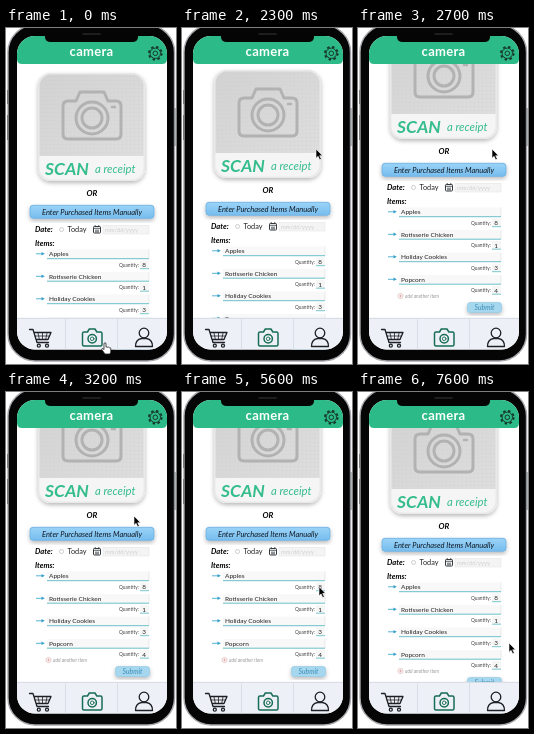
These frames come from a looping animation (170 px wide and 336 px high, 7.7 s). An HTML page:

```html
<!DOCTYPE html>
<html lang="en">
<head>
<meta charset="utf-8">
<title>Receipt app</title>
<style>
  html, body { margin: 0; width: 100%; height: 100%; overflow: hidden; background: #fff; }
  svg { display: block; width: 170px; height: 336px; font-family: Lato, "Open Sans", sans-serif; }
  .i { font-style: italic; }
  .b { font-weight: 700; }
  .line { fill: none; stroke-linecap: round; stroke-linejoin: round; }
</style>
</head>
<body>
<svg viewBox="0 0 170 336">
  <defs>
    <clipPath id="screen"><rect x="11" y="8" width="150" height="313.5" rx="18"/></clipPath>
    <clipPath id="cardClip"><rect x="32" y="45" width="107" height="108" rx="13"/></clipPath>
    <linearGradient id="photo" x1="0" y1="0" x2="1" y2="1">
      <stop offset="0" stop-color="#d2d2d2"/><stop offset="1" stop-color="#dedede"/>
    </linearGradient>
    <linearGradient id="blue" x1="0" y1="0" x2="0" y2="1">
      <stop offset="0" stop-color="#9bd3f8"/><stop offset="1" stop-color="#76bdee"/>
    </linearGradient>
    <pattern id="mesh" width="4" height="4" patternUnits="userSpaceOnUse">
      <path d="M0 0H4M0 0V4" stroke="#c8c8c8" stroke-width=".5"/>
    </pattern>
    <filter id="soft" x="-20%" y="-20%" width="140%" height="150%">
      <feDropShadow dx="0" dy="2" stdDeviation="2" flood-color="#000" flood-opacity=".28"/>
    </filter>
  </defs>

  <!-- phone body -->
  <rect x="2" y="-3" width="166.5" height="336" rx="27" fill="#050506" stroke="#a4a6aa" stroke-width="1.4"/>
  <path d="M1.5 62V76M1.5 87V112M169 80V118" stroke="#77797d"/>

  <g clip-path="url(#screen)">
    <rect x="11" y="8" width="150" height="314" fill="#fff"/>

    <g id="page">
      <rect x="32" y="45" width="107" height="108" rx="13" fill="#f4f4f4" filter="url(#soft)"/>
      <g clip-path="url(#cardClip)">
        <rect x="32" y="45" width="107" height="83" fill="url(#photo)"/>
        <rect x="32" y="45" width="107" height="83" fill="url(#mesh)" opacity=".5"/>
        <rect x="32" y="128" width="107" height="25" fill="#f5f5f5"/>
      </g>
      <rect x="32.7" y="45.7" width="105.6" height="106.6" rx="12.5" fill="none" stroke="#e9e9e9" stroke-width="1.6"/>
      <g class="line" stroke="#b2b2b2" stroke-width="3">
        <path d="M62 73H70L74 64H98L102 73H110Q115 73 115 78V106Q115 111 110 111H62Q57 111 57 106V78Q57 73 62 73Z"/>
        <circle cx="86" cy="90" r="16"/>
        <circle cx="86" cy="90" r="10"/>
        <path d="M106 79H109" stroke-width="2.4"/>
      </g>
      <text class="i b" x="39" y="146.5" font-size="17.5" fill="#35bd8d">SCAN</text>
      <text class="i" x="89" y="145" font-size="11.3" fill="#35bd8d">a receipt</text>

      <text class="i b" x="86" y="168" font-size="8" text-anchor="middle">OR</text>

      <rect x="24" y="177.3" width="124" height="13" rx="3" fill="url(#blue)" stroke="#68aee0" stroke-width=".8" filter="url(#soft)"/>
      <text class="i" x="86" y="186.7" font-size="7.5" text-anchor="middle" fill="#101820">Enter Purchased Items Manually</text>

      <text class="i b" x="29" y="204" font-size="7.6">Date:</text>
      <circle cx="55.5" cy="201.5" r="2" fill="#fff" stroke="#bbb" stroke-width=".7"/>
      <text x="61.5" y="204" font-size="7.3" fill="#222">Today</text>
      <rect x="87.5" y="198.5" width="7" height="6.5" rx=".8" fill="#fff" stroke="#34393e" stroke-width="1"/>
      <path d="M87.5 200.3H94.5M89.2 197V199M92.8 197V199M89 202.2H93M89 203.8H93" stroke="#34393e" stroke-width=".8"/>
      <rect x="97" y="197.5" width="46" height="8.5" fill="#f4f4f4" stroke="#e2e2e2" stroke-width=".5"/>
      <text x="99" y="203.7" font-size="5.8" fill="#cfcfcf">mm/dd/yyyy</text>

      <text class="i b" x="29" y="218" font-size="7.6">Items:</text>
      <g id="items"></g>

      <circle cx="42.5" cy="310" r="2.6" fill="none" stroke="#dba9a9" stroke-width=".6"/>
      <path d="M41 310H44M42.5 308.5V311.5" stroke="#d08f8f" stroke-width=".6"/>
      <text class="i" x="47" y="312" font-size="4.8" fill="#999">add another item</text>
      <rect x="109.5" y="316.5" width="34" height="10" rx="2.5" fill="#a5d7ef" stroke="#8fc8e5" stroke-width=".6" filter="url(#soft)"/>
      <text class="i" x="126.5" y="324" font-size="6.8" text-anchor="middle" fill="#3f8db5">Submit</text>
    </g>

    <!-- header -->
    <path d="M11 0H161V31Q161 36 156 36H16Q11 36 11 31Z" fill="#2cbb88"/>
    <text class="b" x="85.5" y="27.8" font-size="13" letter-spacing=".3" text-anchor="middle" fill="#fff">camera</text>
    <g fill="none" stroke="#17352c">
      <circle cx="149.3" cy="25.3" r="6.4" stroke-width="1.8" stroke-dasharray="2.51 2.51"/>
      <circle cx="149.3" cy="25.3" r="5.2" stroke-width="1"/>
      <circle cx="149.3" cy="25.3" r="2.3" stroke-width="1"/>
    </g>

    <!-- tab bar -->
    <rect x="11" y="290" width="150" height="32" fill="#edf0f6"/>
    <path d="M11 290.3H161" stroke="#c9ced8" stroke-width=".7"/>
    <path d="M59.5 291V322M111.5 291V322" stroke="#d4d8e1" stroke-width=".8"/>
    <g class="line" stroke="#1d2024" stroke-width="1.3">
      <path d="M23.5 301.5H27L31 314.5H42.5M28 304.5H45L42 311.5H30"/>
      <path d="M32 305L33.3 311M36.5 305V311M41 305L39.8 311M29 308H43" stroke-width=".8"/>
      <circle cx="32.8" cy="317.7" r="1.5"/><circle cx="41" cy="317.7" r="1.5"/>
      <circle cx="138" cy="305" r="4.8"/>
      <path d="M129.5 318.5Q129.5 311.5 135.5 310.5H140.5Q146.5 311.5 146.5 318.5Z"/>
    </g>
    <g class="line" stroke="#176d55" stroke-width="1.5">
      <path d="M78 304H81.5L83.3 301H89L90.8 304H94.5Q96 304 96 305.5V316.5Q96 318 94.5 318H78Q76.5 318 76.5 316.5V305.5Q76.5 304 78 304Z"/>
      <circle cx="86.2" cy="310.8" r="4.2"/><circle cx="86.2" cy="310.8" r="1.8" stroke-width=".9"/>
    </g>
  </g>

  <path d="M35 6Q39 6 39 9Q39 14 45 14H126Q132 14 132 9Q132 6 136 6V2H35Z" fill="#050506"/>
  <path d="M77 6H94" stroke="#25272a" stroke-width="1.6" stroke-linecap="round"/>

  <g id="arrow"><path d="M0 0V9.2L2.1 7.3L3.7 10.8L5.3 10.1L3.7 6.7H6.5Z" fill="#000" stroke="#fff" stroke-width=".6"/></g>
  <g id="hand"><path d="M-1 1Q-1-.3 0-.3T1 1V4.2Q2 3.3 2.8 4.4Q3.8 3.6 4.5 4.8Q5.8 4.3 5.8 5.8V8Q5.8 9.5 4.8 11H0L-3.2 6.6Q-3.4 5.2-2.1 5.5L-1 6.6Z" fill="#fff" stroke="#222" stroke-width=".8"/></g>
</svg>

<script>
  const LOOP = 7700, STEP = 100;
  const $ = id => document.getElementById(id);

  const items = [["Apples", 8], ["Rotisserie Chicken", 1], ["Holiday Cookies", 3], ["Popcorn", 4]];
  $("items").innerHTML = items.map(([name, count], i) => `
    <g transform="translate(0 ${i * 22.5})">
      <path d="M30 225.8H36" stroke="#55b5d8" stroke-width="1"/>
      <path d="M35.5 224L38.8 225.8L35.5 227.6Z" fill="#359fca"/>
      <rect x="41" y="221.5" width="102" height="9" fill="#f8f8f8"/>
      <path d="M143 221.5V230.5" stroke="#ddd" stroke-width=".6"/>
      <path d="M41 230.7H143" stroke="#5cbac4" stroke-width=".9"/>
      <text x="43" y="228.3" font-size="6.5" fill="#222">${name}</text>
      <text x="113" y="238.6" font-size="4.8" fill="#444">Quantity:</text>
      <rect x="134" y="232.5" width="9" height="8" fill="#f6f6f6"/>
      <path d="M134 240.7H143" stroke="#5cbac4" stroke-width=".8"/>
      <text x="138" y="239.2" font-size="6.4" text-anchor="middle" fill="#222">${count}</text>
    </g>`).join("");

  // Each key: time, then values
  const scroll = [[0, 0], [2200, 0], [2300, 3], [2400, 15], [2500, 29], [2600, 38], [2700, 42],
    [7300, 42], [7400, 40], [7500, 36], [7600, 31]];
  const pointer = [[0, 99, 315], [700, 99, 315], [1200, 112, 230], [1800, 134, 121], [2700, 134, 121],
    [3200, 128, 124], [4000, 102, 158], [4400, 100, 160], [4900, 100, 160],
    [5500, 136, 190], [6100, 142, 218], [6700, 147, 244], [7200, 151, 251], [7600, 151, 251]];

  function sample(keys, t) {
    const n = keys.findIndex(k => k[0] > t);
    if (n < 0) return keys[keys.length - 1].slice(1);
    const a = keys[n - 1], b = keys[n], p = (t - a[0]) / (b[0] - a[0]);
    return a.slice(1).map((v, i) => v + (b[i + 1] - v) * p);
  }

  function draw() {
    const t = Math.floor(performance.now() % LOOP / STEP) * STEP;
    const [top] = sample(scroll, t), [x, y] = sample(pointer, t);
    $("page").setAttribute("transform", `translate(0 ${-top})`);
    const onTab = y > 290;
    for (const [id, on] of [["hand", onTab], ["arrow", !onTab]]) {
      $(id).setAttribute("transform", `translate(${x} ${y})`);
      $(id).style.display = on ? "" : "none";
    }
    requestAnimationFrame(draw);
  }
  draw();
</script>
</body>
</html>
```
